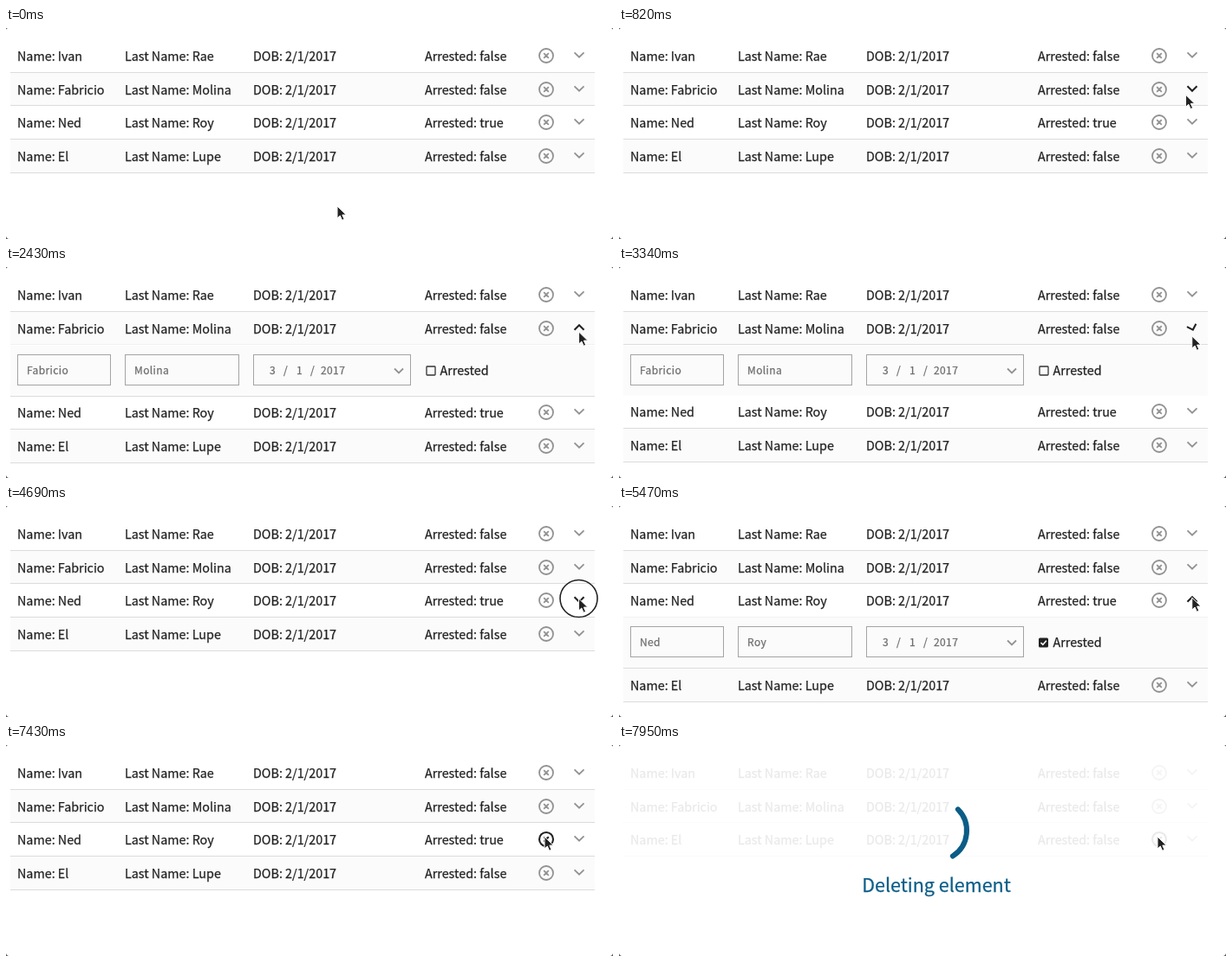
An HTML page that plays this animation: 700x244 px, repeating every 8 s.

```html
<!DOCTYPE html>
<html lang="en">
<head>
<meta charset="utf-8">
<title>Expandable list</title>
<style>
  html, body { margin: 0; width: 100%; height: 100%; overflow: hidden; background: #fff; }
  svg { display: block; }
  text { font: 14.33px "Noto Sans CJK JP", "Noto Sans CJK SC", "Noto Sans CJK", "Open Sans", sans-serif; fill: #222; stroke: #222; stroke-width: .25px; white-space: pre; }
  .field text { font-size: 12px; letter-spacing: .4px; fill: #6e6e6e; stroke: #6e6e6e; }
  .field rect { fill: none; stroke: #a4a4a4; }
  .rule { stroke: #dcdcdc; }
  .icon { fill: none; stroke: #929292; stroke-width: 1.8; }
  .hover { stroke: #222; stroke-width: 2.1; }
  #overlay text { font-size: 21.5px; fill: #0b5d87; stroke: #0b5d87; text-anchor: middle; }
</style>
</head>
<body>
<svg id="stage" width="700" height="244" viewBox="0 0 700 244">
  <rect width="700" height="244" fill="#fff"/>
  <g id="list"></g>
  <g id="overlay">
    <rect width="700" height="244" fill="#fff" opacity=".9"/>
    <path id="spinner" fill="none" stroke="#0b5d87" stroke-width="6" stroke-linecap="round"/>
    <text x="366" y="170">Deleting element</text>
  </g>
  <circle id="ring" r="21.5" fill="none" stroke="#222" stroke-width="1.6"/>
  <path id="cursor" d="M0 0V14L3.3 11L5.6 16.3L8.1 15.2L5.8 10.1H10.3Z" fill="#222" stroke="#fff" stroke-width="1" stroke-linejoin="round"/>
  <path d="M0 241V244H3Q.6 243.4 0 241ZM700 241V244H697Q699.4 243.4 700 241ZM0 2V0H2Q.4 .4 0 2ZM700 2V0H698Q699.6 .4 700 2Z" fill="#555"/>
</svg>
<script>
const LOOP = 8000, PITCH = 38.67, FORM_HEIGHT = 59, DELETE_AT = 7800;
const $ = id => document.getElementById(id);

const people = [
  { first: 'Ivan', last: 'Rae', arrested: false },
  { first: 'Fabricio', last: 'Molina', arrested: false,
    form: [1400, 1500, 3330, 3450], turn: [1440, 1700, 3200, 3375] },
  { first: 'Ned', last: 'Roy', arrested: true,
    form: [4760, 4860, 6470, 6590], turn: [4760, 5020, 6440, 6640] },
  { first: 'El', last: 'Lupe', arrested: false }
];

// [start, end, x, y]: the pointer travels to x, y
const moves = [
  [60, 900, 660.5, 74],
  [2300, 2800, 660.8, 80],
  [3600, 4250, 660.5, 107],
  [4900, 5300, 660.8, 106],
  [6800, 7380, 621, 106]
];
const clicks = [[1330, 1460], [3120, 3270], [4620, 4760], [6310, 6450], [7500, 7640]];

const ramp = (t, a, b) => Math.min(1, Math.max(0, (t - a) / (b - a)));
const ease = k => k * k * (3 - 2 * k);
const rowTop = i => Math.round(13 + PITCH * i);
const rowLine = i => Math.floor(51 + PITCH * i) + .5 - rowTop(i);
const text = (x, y, s) => `<text x="${x}" y="${y}">${s}</text>`;
const rule = y => `<path class="rule" d="M5 ${y}H679"/>`;
const shade = h => `<rect x="5" width="674" height="${h}" fill="#fbfbfb"/>`;

function rowMarkup(p, i) {
  return (i % 2 ? shade(38) : '') + rule(rowLine(i)) +
    text(13, 25, 'Name: ' + p.first) +
    text(137, 25, 'Last Name: ' + p.last) +
    text(285, 25, 'DOB: 2/1/2017') +
    text(483, 25, 'Arrested: ' + p.arrested) +
    `<path class="icon remove" d="M615 19a8 8 0 1 0 16 0a8 8 0 1 0 -16 0M620.2 16.2l5.6 5.6m0 -5.6l-5.6 5.6"/>
     <path class="icon chevron" d="M-5.5 -2.7L0 2.7L5.5 -2.7"/>`;
}

function formMarkup(p) {
  const box = (x, w) => `<rect x="${x + .5}" y="10.5" width="${w - 1}" height="35"/>`;
  const date = [[304, 3], [320, '/'], [335, 1], [351, '/'], [363, 2017]];
  const check = p.arrested
    ? '<rect x="484" y="23.5" width="11" height="11" rx="1.5" fill="#222"/><path d="M486.5 29l2.3 2.4l4 -4.6" fill="none" stroke="#fff" stroke-width="1.6"/>'
    : '<rect x="485" y="24" width="10" height="10" rx=".8" fill="none" stroke="#333" stroke-width="1.3"/>';
  return shade(FORM_HEIGHT) +
    `<g class="field">${box(13, 108)}${box(137, 132)}${box(285, 182)}` +
    text(24, 33, p.first) + text(148, 33, p.last) +
    date.map(([x, s]) => text(x, 33, s)).join('') +
    '<path class="icon" d="M448 26.5l5 5l5 -5"/></g>' +
    check + text(500.5, 34, 'Arrested') + rule(58.5);
}

$('list').innerHTML = people.map((p, i) =>
  `<g class="row"><svg class="form" y="39" width="700">${p.form ? formMarkup(p) : ''}</svg><g class="head">${rowMarkup(p, i)}</g></g>`
).join('');

const rows = [...document.querySelectorAll('.row')].map((g, i) => ({
  ...people[i], g,
  panel: g.querySelector('.form'),
  line: g.querySelector('.head .rule'),
  chevron: g.querySelector('.chevron'),
  remove: g.querySelector('.remove')
}));

function pointerAt(t) {
  let x = 382, y = 206;
  for (const [a, b, toX, toY] of moves) {
    const k = ease(ramp(t, a, b));
    x += (toX - x) * k;
    y += (toY - y) * k;
  }
  return [x, y];
}

function openness(t, [a, b, c, d]) {
  return ease(ramp(t, a, b)) - ease(ramp(t, c, d));
}

function turnAngle(t, [a, b, c, d]) {
  return 180 * (ease(ramp(t, a, b)) + ease(ramp(t, c, d)));
}

function drawRows(t, px, py) {
  const deleted = t >= DELETE_AT;
  let shift = 0;
  rows.forEach((r, i) => {
    const slot = deleted && i === 3 ? 2 : i;
    const y = rowTop(slot) + shift;
    const extra = r.form ? Math.round(FORM_HEIGHT * openness(t, r.form)) : 0;
    const opened = r.form && t >= r.form[0] && t < r.form[2];
    const near = x => Math.abs(px - x) < 10 && Math.abs(py - y - 19) < 11;
    r.g.setAttribute('transform', `translate(0 ${y})`);
    r.g.style.display = deleted && i === 2 ? 'none' : '';
    r.panel.setAttribute('height', extra);
    r.panel.style.display = extra > 0 ? '' : 'none';
    r.line.setAttribute('opacity', opened ? .35 : 1);
    r.chevron.setAttribute('transform', `translate(661 18) rotate(${r.turn ? turnAngle(t, r.turn) : 0})`);
    r.chevron.classList.toggle('hover', near(661));
    r.remove.classList.toggle('hover', near(623));
    shift += extra;
  });
}

function drawSpinner(t) {
  const start = (t - 7950) * .36 - 45;
  const point = deg => {
    const a = deg * Math.PI / 180;
    return `${366 + 35 * Math.cos(a)} ${99 + 35 * Math.sin(a)}`;
  };
  $('spinner').setAttribute('d', `M${point(start)}A35 35 0 0 1 ${point(start + 102)}`);
}

function render(t) {
  const [x, y] = pointerAt(t);
  const at = `translate(${x} ${y})`;
  drawRows(t, x, y);
  drawSpinner(t);
  $('overlay').setAttribute('opacity', ramp(t, 7680, 7850));
  $('cursor').setAttribute('transform', at);
  $('ring').setAttribute('transform', at);
  $('ring').style.display = clicks.some(([a, b]) => t >= a && t < b) ? '' : 'none';
}

const begin = performance.now();
function tick() {
  render((performance.now() - begin) % LOOP);
  requestAnimationFrame(tick);
}
tick();
</script>
</body>
</html>
```
